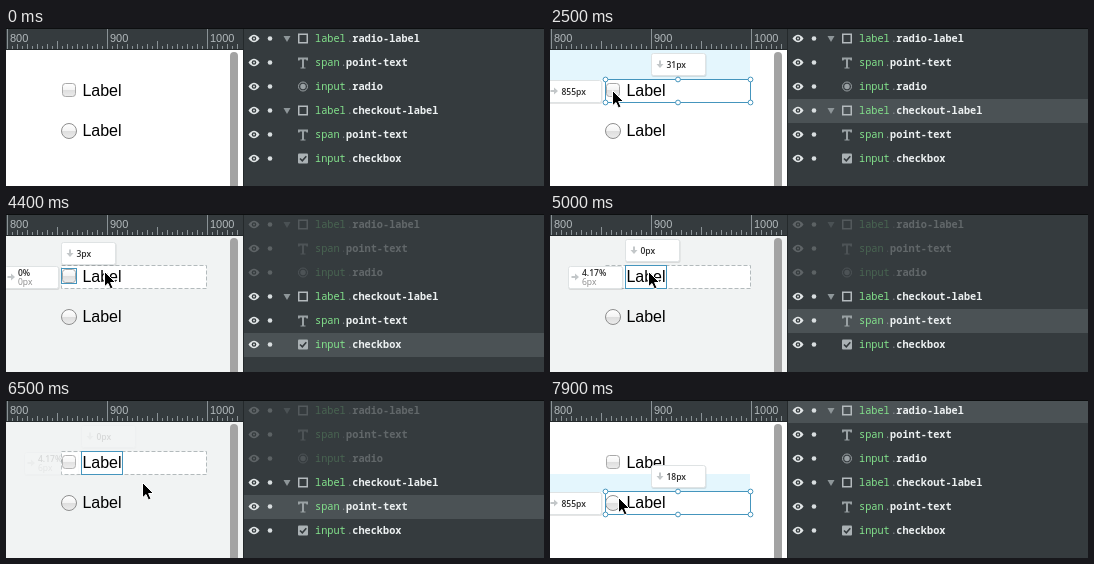
Write an HTML page that moves like this. It is 538 by 158 pixels and loops after 8000 ms.

```html
<!DOCTYPE html>
<html lang="en">
<head>
<meta charset="utf-8">
<title>Layer selection</title>
<style>
html, body { margin: 0; width: 538px; height: 158px; overflow: hidden; background: #fff; }
svg { display: block; }
.label { font: 16px "Liberation Sans", Arial, sans-serif; }
.ruler { font: 11px "Liberation Sans", Arial, sans-serif; fill: #b3babd; }
.code { font: 500 10.25px "Noto Sans Mono", "DejaVu Sans Mono", monospace; fill: #83e28c; }
.code .dot { fill: #8b9397; }
.code .cls { fill: #edf1f2; font-weight: 600; }
.tip { font: 600 8.5px "Open Sans", "Noto Sans", sans-serif; fill: #2b2b2b; }
.tip .sub { fill: #888; font-weight: 400; }
</style>
</head>
<body>
<svg id="stage" width="538" height="158" viewBox="0 0 538 158"></svg>
<script>
const LOOP = 8000, STEP = 100;
const stage = document.getElementById('stage');
const BLUE = '#4595bd';

const ROWS = [
  ['label', 'radio-label', 'box'], ['span', 'point-text', 'type'], ['input', 'radio', 'radio'],
  ['label', 'checkout-label', 'box'], ['span', 'point-text', 'type'], ['input', 'checkbox', 'check']
];

// Each state lasts until the next: highlighted row, isolated group, selection and its distances
const STATES = [
  { at: 0 },
  { at: 2500, row: 3, sel: [55, 51, 145, 23], group: true, top: '31px', left: ['855px'] },
  { at: 2800, isolated: true },
  { at: 3600, isolated: true, row: 5, sel: [55, 54, 15, 15], top: '3px', left: ['0%', '0px'] },
  { at: 5000, isolated: true, row: 4, sel: [75, 51, 41, 23], top: '0px', left: ['4.17%', '6px'] },
  { at: 6600, isolated: true },
  { at: 6800 },
  { at: 7800, row: 0, sel: [55, 91, 145, 23], group: true, top: '18px', left: ['855px'] }
];

// Pointer path: time, x, y
const PATH = [
  [0, 74, 170], [800, 74, 170], [1200, 54, 108], [1600, 62.5, 62.5],
  [3800, 62.5, 62.5], [4100, 76, 88], [4400, 98.5, 57.5],
  [5200, 98.5, 57.5], [5500, 142.5, 60.5], [5600, 142.5, 60.5], [6100, 136.5, 82.5],
  [7100, 136.5, 82.5], [7500, 68.5, 97.5], [LOOP, 68.5, 97.5]
];

const rect = (x, y, w, h, fill, more = '') =>
  `<rect x="${x}" y="${y}" width="${w}" height="${h}" fill="${fill}" ${more}/>`;
const path = (d, fill, more = '') => `<path d="${d}" fill="${fill}" ${more}/>`;
const circle = (x, y, r, fill, more = '') => `<circle cx="${x}" cy="${y}" r="${r}" fill="${fill}" ${more}/>`;
const text = (x, y, cls, s) => `<text x="${x}" y="${y}" class="${cls}">${s}</text>`;
const outline = (x, y, w, h, color, fill = 'none', more = '') =>
  rect(x + .5, y + .5, w, h, fill, `stroke="${color}" ${more}`);

function ruler() {
  let ticks = '';
  for (let x = 0; x < 235; x += 5) {
    const top = x % 100 === 0 ? 1 : x % 50 === 0 ? 13 : x % 10 ? 18 : 16;
    ticks += `M${x + 1.5} ${top}V21`;
  }
  return rect(0, 0, 237, 22, '#353b3e') + path(ticks, 'none', 'stroke="#8a9296"') +
    [800, 900, 1000].map(n => text(n - 796, 14, 'ruler', n)).join('') +
    rect(0, 21, 237, 1, '#24292b');
}

const ICONS = {
  box: y => rect(292.75, y - 4.25, 8.5, 8.5, 'none', 'stroke="#b4babd" stroke-width="1.5"'),
  type: y => path(`M292 ${y - 5}h10v3h-1.5l-.5-1h-2v8h1.5v1h-5v-1h1.5v-8h-2l-.5 1H292z`, '#9aa1a4'),
  radio: y => circle(297, y, 4.5, 'none', 'stroke="#9aa1a4"') + circle(297, y, 2.7, '#9aa1a4'),
  check: y => rect(292, y - 5, 10, 10, '#aab1b4', 'rx="1"') +
    path(`M294 ${y}l2.3 2.3l4-4.6`, 'none', 'stroke="#33393c" stroke-width="1.6"')
};

function layer([tag, cls, icon], i, state) {
  const y = 10.5 + 24 * i, x = 309 + tag.length * 6.15;
  const lit = state.row === i ? rect(238, y - 11.5, 300, 24, '#4b5255') : '';
  const eye = path(`M242.5 ${y}q5.5 -7.5 11 0q-5.5 7.5 -11 0z`, '#e3e7e8') +
    circle(248, y, 2.3, '#353b3e') + circle(248, y, .9, '#e3e7e8') + circle(264, y, 2.3, '#d8dddf');
  const arrow = icon === 'box' ? path(`M277.5 ${y - 2.5}h7l-3.5 6z`, '#8e9699') : '';
  const name = `<text x="309" y="${y + 3.5}" class="code">${tag}` +
    `<tspan class="dot" x="${x + 1}">.</tspan><tspan class="cls" x="${x + 6.5}">${cls}</tspan></text>`;
  const alpha = state.isolated && i < 3 ? .24 : 1;
  return lit + `<g opacity="${alpha}">${eye}${arrow}${ICONS[icon](y)}${name}</g>`;
}

function controls() {
  return outline(56, 55, 13, 13, '#a9a9a9', 'url(#shade)', 'rx="3"') + text(76.4, 68, 'label', 'Label') +
    circle(63, 103, 7.5, 'url(#shade)', 'stroke="#8e8e8e"') + text(76.4, 108, 'label', 'Label');
}

function tipBox(x, y, lines, down) {
  const arrow = path('M-3.5 -1H0V-3.5L4 0L0 3.5V1H-3.5z', '#c3c7c9',
    `transform="translate(${x + (down ? 9 : 7)} ${y + 11})${down ? ' rotate(90)' : ''}"`);
  const words = lines.length > 1
    ? text(x + 14, y + 10, '', lines[0]) + text(x + 14, y + 18.5, 'sub', lines[1])
    : text(x + (down ? 15.5 : 14.5), y + 14.5, '', lines[0]);
  return rect(x + .5, y + 1, 55, 23, '#000', 'rx="2" opacity=".1"') +
    outline(x, y, 54, 22, '#dfe3e4', '#fff', 'rx="2"') + arrow + words;
}

function selection(state) {
  const [x, y, w, h] = state.sel;
  let s = outline(x, y, w, h, BLUE);
  if (state.group)
    for (const hx of [x, x + w / 2, x + w])
      for (const hy of [y, y + h]) s += circle(hx + .5, hy + .5, 2.4, '#fff', `stroke="${BLUE}"`);
  return s;
}

function tips(state, t) {
  const [x, y] = state.sel, age = t - state.at;
  const alpha = Math.max(0, Math.min(1, (1600 - age) / 800));
  return `<g class="tip" opacity="${alpha}">` +
    tipBox(state.group ? 101 : x, y - 26, [state.top], true) +
    tipBox(state.group ? -3 : x - 57, y > 80 ? 92 : 52, state.left) + '</g>';
}

function pointer(t) {
  const i = PATH.findIndex(p => p[0] > t);
  const [t0, x0, y0] = PATH[i - 1], [t1, x1, y1] = PATH[i];
  const k = (t - t0) / (t1 - t0);
  return path('M0 0V15.3L3.5 12L5.9 17.4L8.5 16.3L6.1 11H11Z', '#000',
    `stroke="#fff" transform="translate(${x0 + (x1 - x0) * k} ${y0 + (y1 - y0) * k})"`);
}

function draw(t) {
  const state = STATES.findLast(s => s.at <= t);
  let s = `<defs><linearGradient id="shade" x2="0" y2="1"><stop stop-color="#fff"/>
    <stop offset=".48" stop-color="#f4f4f4"/><stop offset=".52" stop-color="#dedede"/>
    <stop offset="1" stop-color="#ececec"/></linearGradient></defs>`;
  s += rect(0, 0, 237, 158, state.isolated ? '#f1f3f3' : '#fff');
  if (state.group) s += state.row ? rect(0, 22, 200, 30, '#e4f6fd') : rect(0, 74, 200, 18, '#e4f6fd');
  if (state.isolated) s += outline(55, 51, 145, 23, '#b3babc', '#fff', 'stroke-dasharray="4 2"');
  s += controls();
  if (state.sel) s += selection(state) + tips(state, t);
  s += rect(224, 24, 8, 150, '#a3a3a3', 'rx="4"') + pointer(t) + ruler();
  s += rect(237, 0, 301, 158, '#353b3e') + rect(237, 0, 1, 158, '#24292b');
  s += ROWS.map((row, i) => layer(row, i, state)).join('');
  s += rect(0, 0, 538, 1, '#0d0f10');
  stage.innerHTML = s;
}

let last = -1;
function tick() {
  const t = Math.floor(performance.now() % LOOP / STEP) * STEP;
  if (t !== last) draw(last = t);
  requestAnimationFrame(tick);
}
tick();
</script>
</body>
</html>
```
